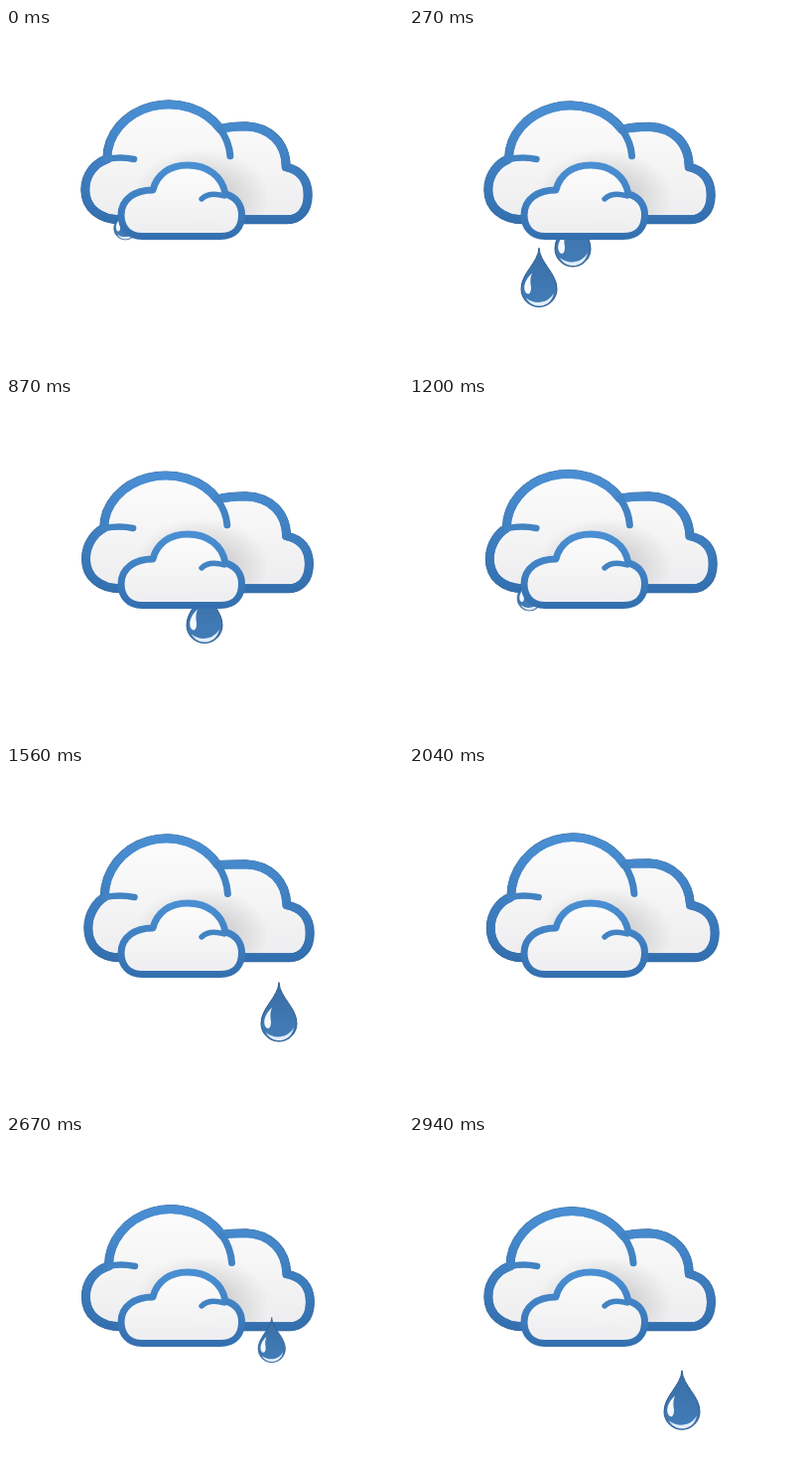
An HTML page for the animation above (2.97 s loop, 400x343 px).

```html
<!DOCTYPE html>
<html>
<head>
<meta charset="utf-8">
<style>
html, body { margin: 0; width: 100%; height: 100%; overflow: hidden; background: #fff; }
svg { display: block; width: 400px; height: 343px; }
path { stroke-linecap: round; stroke-linejoin: round; }
.edge { fill: none; stroke: #265583; }
.curl { fill: none; stroke: #4283c3; }
.back { stroke-width: 8.4; }
.front { stroke-width: 7; }
</style>
</head>
<body>
<svg viewBox="0 0 400 343">
  <defs>
    <linearGradient id="rim" x1="0" y1="0" x2="0" y2="1">
      <stop offset="0" stop-color="#4a8fd3"/><stop offset="1" stop-color="#3470b0"/>
    </linearGradient>
    <linearGradient id="white" x1="0" y1="0" x2="0" y2="1">
      <stop offset="0" stop-color="#fcfcfc"/><stop offset=".5" stop-color="#f5f5f6"/><stop offset="1" stop-color="#ededef"/>
    </linearGradient>
    <radialGradient id="shade">
      <stop offset=".4" stop-color="#555" stop-opacity=".2"/><stop offset="1" stop-color="#555" stop-opacity="0"/>
    </radialGradient>
    <linearGradient id="water" x1="0" y1="0" x2="0" y2="1">
      <stop offset="0" stop-color="#3a6ea5"/><stop offset="1" stop-color="#427db9"/>
    </linearGradient>
    <clipPath id="inside"><path id="insidePath"/></clipPath>
    <g id="drop">
      <path fill="url(#water)" stroke="#2c5b8c" d="M0 0C1 15 18 25 18 41A18 18 0 0 1 -18 41C-18 25 -1 15 0 0Z"/>
      <path fill="#f4f8fc" d="M-7 25C-14 31 -17 40 -13 45C-9 48 -8 43 -8 39C-9 34 -9 30 -7 25Z"/>
      <path fill="#e4edf7" d="M-13 50C-5 57 9 56 15 45C12 61 -7 62 -13 50Z"/>
    </g>
  </defs>

  <path id="backEdge" class="edge" stroke-width="9.4"/>
  <path id="backCloud" class="back" fill="url(#white)" stroke="url(#rim)"/>
  <g clip-path="url(#inside)">
    <ellipse cx="197" cy="170" rx="68" ry="48" fill="url(#shade)"/>
  </g>
  <path id="backLine" class="back" fill="none" stroke="url(#rim)"/>
  <path id="leftCurl" class="curl" stroke-width="6.5"/>
  <path id="rightCurl" class="curl" stroke-width="7"/>
  <g id="drops"></g>
  <path class="front" fill="url(#white)" stroke="url(#rim)"
    d="M137 209.5C123 209.5 116 200 116 188C116 172 130 163 148 163C152 147 165 138 183 138C203 138 218 149 221 167C232 170 237.5 178 237.5 188C237.5 201 230 209.5 216 209.5Z"/>
  <path class="curl" stroke-width="5.4" d="M197 172Q205 164.500 220 169"/>
</svg>
<script>
const LOOP = 2970, STEP = 30, SPEED = 0.25, GROUND = 300, HEIGHT = 59;
const $ = id => document.getElementById(id);

// Each drop hangs at `top` while growing, then falls and vanishes at `end`.
const drops = [
  { x: 131, top: 175, end: 348 },
  { x: 165, top: 172, end: 510 },
  { x: 275, top: 184, end: 818 },
  { x: 200, top: 172, end: 1080 },
  { x: 131, top: 175, end: 1540 },
  { x: 275, top: 184, end: 1652 },
  { x: 165, top: 172, end: 1980 },
  { x: 239, top: 172, end: 2616 },
  { x: 275, top: 184, end: 2955 }
];
for (const drop of drops) {
  drop.node = document.createElementNS("http://www.w3.org/2000/svg", "use");
  drop.node.setAttribute("href", "#drop");
  $("drops").append(drop.node);
}

// Offsets of the cloud's parts: time, crown y, crown x, left puff, right puff, shoulder.
const sway = [
  [0, 0, 0, 0, 0, 0],
  [510, 2, -2.5, 0, 0, 1],
  [800, 2.5, -3, 0.5, 1, 1],
  [1200, 0.5, -3.5, 1.5, 2, 1],
  [1560, -4, -2.5, 3, 2, 0],
  [2040, -5, 1, 2.5, 4, -1],
  [2340, -4, 3, 1.5, 4, -1],
  [2700, -2, 1.5, 0.5, 2, 0],
  [2970, 0, 0, 0, 0, 0]
];

function swayAt(t) {
  const i = sway.findIndex(key => key[0] > t);
  const from = sway[i - 1], to = sway[i];
  const p = (t - from[0]) / (to[0] - from[0]);
  return from.slice(1).map((v, k) => v + (to[k + 1] - v) * p);
}

function drawCloud(t) {
  const [lift, shift, left, right, shoulder] = swayAt(t);
  const l = 80 + left, r = 304 + right, s = 99 + shoulder;
  // The crown is an ellipse whose right end runs on into the inner curl.
  const rx = 62, cx = 164 + shift, cy = 132, ry = cy - 77 - lift;
  const crown = angle => `${cx + rx * Math.cos(angle)} ${cy - ry * Math.sin(angle)}`;
  const arcTo = angle => `A${rx} ${ry} 0 0 1 ${crown(angle)}`;
  const joint = 0.58;

  const d = `M115 192.5C95 192.5 ${l} 181 ${l} 163C${l} 147 ${l + 10} 136 ${crown(Math.PI)}
    ${arcTo(joint)}C226 ${s} 235 ${s} 242 ${s}C266 ${s + 1} 282 116 ${282 + right / 3} 140
    C${r - 8} 143 ${r} 153 ${r} 168C${r} 183 ${r - 8} 192.5 ${r - 20} 192.5L230 192.5Z`;
  for (const id of ["backEdge", "backCloud", "backLine", "insidePath"]) $(id).setAttribute("d", d);
  $("leftCurl").setAttribute("d", `M${crown(Math.PI)}Q115 129 ${129 + left / 2 + shift * 0.4} 132`);
  $("rightCurl").setAttribute("d", `M${crown(joint)}${arcTo(0.06)}`);
}

function drawDrop({ x, top, end, node }, t) {
  const left = (end - t + LOOP) % LOOP;
  const bottom = GROUND - SPEED * left;
  const size = Math.min(1, (bottom - top) / HEIGHT);
  const visible = left > 0 && size >= 0.6;
  node.setAttribute("visibility", visible ? "visible" : "hidden");
  if (visible) node.setAttribute("transform",
    `translate(${x - 30 * (1 - size)} ${bottom - HEIGHT * size}) scale(${size})`);
}

function draw(now) {
  const t = Math.floor((now % LOOP) / STEP) * STEP;
  drawCloud(t);
  drops.forEach(drop => drawDrop(drop, t));
}

const start = performance.now();
function tick() {
  draw(performance.now() - start);
  requestAnimationFrame(tick);
}
tick();
</script>
</body>
</html>
```
